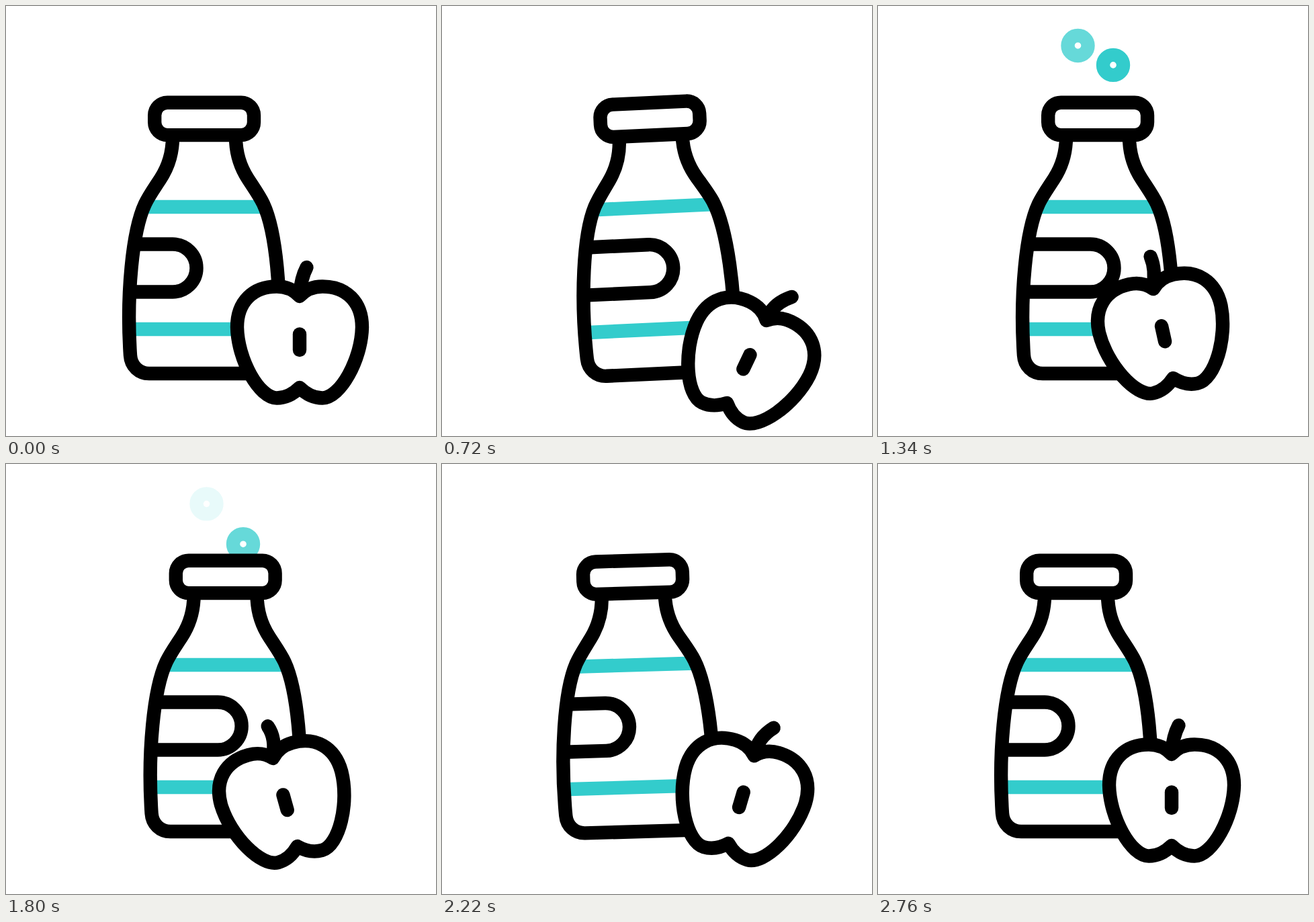
An HTML page that plays this animation: 640x640 px, repeating every 3 s.

```html
<!DOCTYPE html>
<html lang="en">
<head>
<meta charset="utf-8">
<title>Bottle and apple</title>
<style>
html, body { margin: 0; width: 100%; height: 100%; overflow: hidden; background: #fff; }
svg { display: block; width: 100%; height: 100%; }
.ink, .cyan { fill: none; stroke: #000; stroke-width: 20.4; stroke-linecap: round; stroke-linejoin: round; }
.cyan { stroke: #3cc; }
.white { fill: #fff; }
.flat { stroke-linecap: butt; }
</style>
</head>
<body>
<svg viewBox="0 0 640 640">
  <defs>
    <path id="body" d="M248 195C248 218 241 240 230 257C221 271 213 282 207 294.5C188 335 179 430 185 520C186 536 198 547 213 547H377C392 547 404 536 405 520C411 430 402 335 383 294.5C377 282 369 271 360 257C349 240 342 218 342 195"/>
  </defs>
  <circle class="cyan" id="bubbleA" r="15"/>
  <circle class="cyan" id="bubbleB" r="15"/>
  <g id="bottle">
    <use href="#body" class="white"/>
    <path class="cyan flat" d="M205 299H385M184 481H406"/>
    <path class="ink flat" id="label"/>
    <use href="#body" class="ink"/>
    <rect class="ink white" x="221.2" y="143.7" width="147.8" height="48.4" rx="19"/>
  </g>
  <path class="cyan gust" pathLength="100" d="M43 326Q190 399 370 388"/>
  <path class="cyan gust" pathLength="100" d="M71 396Q213 457 399 436"/>
  <g id="apple">
    <path class="ink" id="stem"/>
    <path class="ink white" d="M0-68C-9-78-21-82.5-34-82.5C-69-82.5-93-60-93-22C-92 27-60 83.5-34 83.5C-20 83.5-9 77 0 68C9 77 20 83.5 34 83.5C60 83.5 92 27 93-22C93-60 69-82.5 34-82.5C21-82.5 9-78 0-68Z"/>
    <path class="ink" d="M0-11.5V12"/>
  </g>
</svg>
<script>
const LOOP = 3000;
const $ = id => document.getElementById(id);
const gusts = document.querySelectorAll('.gust');

const ramp = (t, a, b) => Math.max(0, Math.min(1, (t - a) / (b - a)));
const ease = (t, a, b) => { const u = ramp(t, a, b); return u * u * (3 - 2 * u); };
const hump = (t, a, b) => Math.sin(Math.PI * ramp(t, a, b)) ** 2;

// Apple poses: time, x, y, turn
const poses = [
  [270, 0, 0, 0],
  [720, 16.5, 29.5, 25.5],
  [1340, -12.5, 7, -12.5],
  [1800, -21.5, 3.5, -15.5],
  [2230, 8.5, -0.5, 16.5],
  [2720, 0, 0, 0]
];

function pose(t) {
  const value = [0, 0, 0];
  for (let i = 1; i < poses.length; i++) {
    const [a, ...from] = poses[i - 1], [b, ...to] = poses[i];
    const k = ease(t, a, b);
    to.forEach((v, j) => value[j] += (v - from[j]) * k);
  }
  return value;
}

function drawBottle(t) {
  const out = ease(t, 0, 320) - ease(t, 1780, 2100);
  const lean = 4 * hump(t, 100, 500) - 5 * hump(t, 430, 823) - 5.2 * hump(t, 1930, 2290);
  $('bottle').setAttribute('transform', `translate(${32 * out} 0) rotate(${lean} 295 547)`);
  $('label').setAttribute('d', `M192 354.5H${248 + 36 * out}a35.5 35.5 0 0 1 0 71H186`);
}

function drawApple(t) {
  const [x, y, turn] = pose(t);
  const hop = 19.5 * hump(t, 1090, 1590);
  $('apple').setAttribute('transform', `translate(${437 + x} ${500 + y - hop}) rotate(${turn})`);

  // The stem bends along with the turn
  const bend = 2 - turn / 2 + turn * turn / 80;
  const tipX = 10.5 + turn / 3, tipY = -111 - 5 * ramp(Math.abs(turn), 4, 12);
  $('stem').setAttribute('d', `M0-70Q${bend}-95 ${tipX} ${tipY}`);
}

function drawGusts(t) {
  const head = 100 * ramp(t, 90, 497), tail = 100 * ramp(t, 358, 558);
  for (const g of gusts) {
    g.style.display = head > tail ? '' : 'none';
    g.setAttribute('stroke-dasharray', `${head - tail} 200`);
    g.setAttribute('stroke-dashoffset', -tail);
  }
}

// Thrown up, falls back behind the bottle while fading
function drawBubble(id, t, x, top, peak, fade) {
  const el = $(id);
  el.setAttribute('cx', x);
  el.setAttribute('cy', top + 4e-4 * (t - peak) ** 2);
  el.setAttribute('opacity', t > 960 && t < 2000 ? 1 - ramp(t, fade, fade + 720) : 0);
}

function draw(t) {
  const drift = (t - 1340) / 460;
  drawBubble('bubbleA', t, 297.5 + drift, 38, 1570, 1160);
  drawBubble('bubbleB', t, 350 + 3 * drift, 79.5, 1486, 1620);
  drawBottle(t);
  drawGusts(t);
  drawApple(t);
}

const start = performance.now();
function tick() {
  draw((performance.now() - start) % LOOP);
  requestAnimationFrame(tick);
}
draw(0);
requestAnimationFrame(tick);
</script>
</body>
</html>
```
